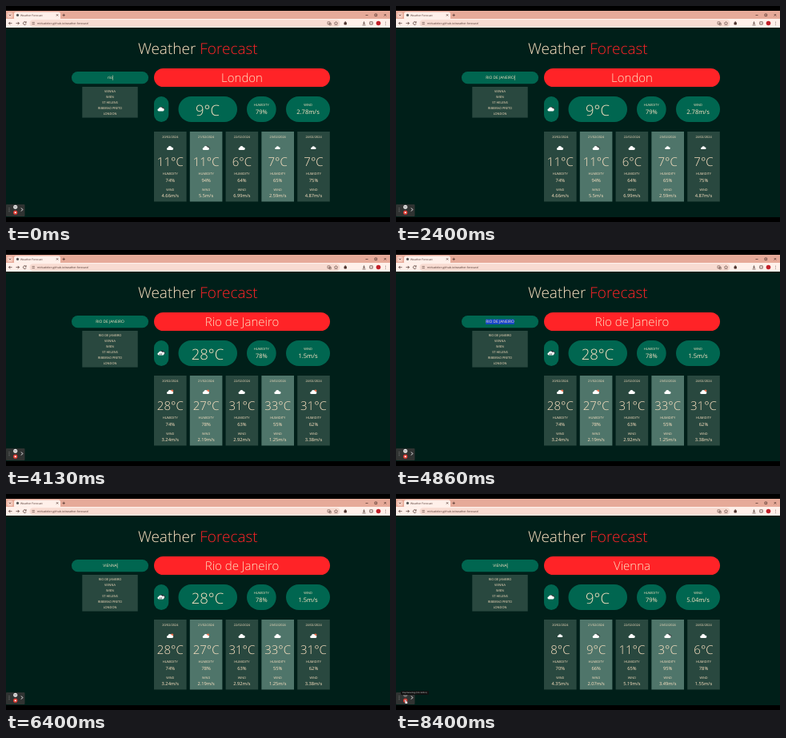
Write an HTML page that moves like this. It is 480x270 px and loops after 8.46 s.

```html
<!DOCTYPE html>
<html lang="en">
<head>
<meta charset="utf-8">
<title>Weather Forecast</title>
<style>
html, body { margin: 0; width: 100%; height: 100%; overflow: hidden; background: #000; }
svg { display: block; width: 480px; height: 270px; }
text { font-family: "Open Sans", "Noto Sans", sans-serif; text-rendering: geometricPrecision; }
</style>
</head>
<body>
<svg id="stage" viewBox="0 0 480 270"></svg>
<script>
const LOOP = 8460;
const CREAM = '#ffe4c4', GREEN = '#006650', RED = '#ff2327', PAGE = '#001f19', INK = '#4a302a';
const stage = document.getElementById('stage');

// Each day: temperature, humidity, wind, icon
const cities = {
  london: { name: 'London', now: [9, 79, 2.78, 'broken'], days: [
    [11, 74, 4.66, 'cloud'], [11, 94, 5.5, 'broken'], [6, 64, 6.99, 'cloud'],
    [7, 65, 2.59, 'small'], [7, 75, 4.87, 'small']] },
  rio: { name: 'Rio de Janeiro', now: [28, 78, 1.5, 'rain'], days: [
    [28, 74, 3.24, 'sun'], [27, 78, 2.19, 'sun'], [31, 63, 2.92, 'cloud'],
    [33, 55, 1.25, 'cloud'], [31, 62, 3.38, 'sun']] },
  vienna: { name: 'Vienna', now: [9, 79, 5.04, 'broken'], days: [
    [8, 70, 4.35, 'small'], [9, 66, 2.07, 'broken'], [11, 65, 5.19, 'cloud'],
    [3, 95, 3.49, 'broken'], [6, 78, 1.55, 'cloud']] }
};
const history = ['VIENNA', 'WIEN', 'ST HELENS', 'RIBEIRAO PRETO', 'LONDON'];

const rect = (x, y, w, h, fill, r = 0) =>
  `<rect x="${x}" y="${y}" width="${w}" height="${h}" rx="${r}" fill="${fill}"/>`;
const dot = (x, y, r, fill) => `<circle cx="${x}" cy="${y}" r="${r}" fill="${fill}"/>`;
const line = (d, color = INK, w = .7) =>
  `<path d="${d}" fill="none" stroke="${color}" stroke-width="${w}"/>`;
const text = (s, x, y, size, { fill = CREAM, weight = 400, anchor = 'middle', id = '' } = {}) =>
  `<text x="${x}" y="${y}" font-size="${size}" fill="${fill}" font-weight="${weight}"
    text-anchor="${anchor}" id="${id}">${s}</text>`;
const light = { weight: 300 };
const left = { anchor: 'start', fill: INK };

const puff = (x, y, k, fill) => `<path fill="${fill}" transform="translate(${x} ${y}) scale(${k})"
  d="M-3 2.5a1.6 1.6 0 0 1 0-3.2a2.6 2.6 0 0 1 5-.3a1.8 1.8 0 0 1 .8 3.5z"/>`;

function icon(kind, x, y) {
  if (kind === 'small') return puff(x, y - .5, .75, '#fff');
  const behind = {
    broken: puff(x + 1.3, y - .9, .85, '#3d4444'),
    sun: dot(x + 2.3, y - 1.6, 1.7, '#ec6e4c'),
    rain: puff(x + 1.6, y - 1, .9, '#263038') + dot(x + 3, y - .3, 1.3, '#fff')
  }[kind] || '';
  const drops = kind === 'rain' ? line(`M${x - 1} ${y + .3}l-1 2m3-2l-1 2`, '#263038', .8) : '';
  return behind + puff(x, y, .95, '#fff') + drops;
}

function browser() {
  return rect(0, 6, 480, 11, '#e6aa99') + rect(1.5, 8, 7, 7, '#f3cabd', 2)
    + rect(10, 7.5, 58, 10, '#fff0ea', 2.5) + rect(0, 16, 480, 11, '#fff0ea')
    + rect(29.5, 17.3, 388, 8.6, '#f8dbd1', 4.3)
    + line('M3.8 10.8l1.2 1.2l1.2-1.2') + dot(14.5, 11.4, 1.6, '#555')
    + text('Weather Forecast', 18, 12.8, 3.4, left)
    + line('M63 10.3l2.2 2.2m0-2.2l-2.2 2.2M70.5 11.4h3.4m-1.7-1.7v3.4')
    + line('M449.5 11.5h3M461 10h2.6v2.6h-2.6zM472.6 10l2.6 2.6m0-2.6l-2.6 2.6')
    + line('M7.5 21.6h-4m1.7-1.7l-1.7 1.7l1.7 1.7M12.5 21.6h4m-1.7-1.7l1.7 1.7l-1.7 1.7')
    + line('M25 20.6a1.9 1.9 0 1 0 .2 1.6M25.2 19.3v1.6h-1.6')
    + line('M32.5 20.6h3.4m-3.4 2h3.4', INK, .6)
    + text('mirkadelon.github.io/weather-forecast/', 39, 23, 3.5, left)
    + line('M402 19.8h3v3h-3zM404 21.5h2.3v2.3H404z', INK, .5)
    + line('M412.5 19.5l.7 1.5l1.6.2l-1.2 1.1l.3 1.6l-1.4-.8l-1.4.8l.3-1.6l-1.2-1.1l1.6-.2z', INK, .5)
    + rect(422.5, 20.2, 3.4, 3.2, INK, .7) + dot(424.2, 20, .8, INK)
    + line('M447.5 19.3v3m-1.4-1.3l1.4 1.4l1.4-1.4M445.5 23.8h4M454.8 19.8h3.4v3.2h-3.4z')
    + dot(465.5, 21.5, 2.8, '#c2202a')
    + [20, 21.6, 23.2].map(y => dot(474.5, y, .45, INK)).join('');
}

function recorder(hover) {
  const bar = rect(0, 248, 23.5, 15, '#303332', 1)
    + [252.8, 254.8, 256.8].map(y => dot(4, y, .5, '#999')).join('')
    + dot(11.7, 251.2, 2.5, hover ? '#777' : '#eee') + dot(11.7, 258.2, 2.6, '#e23a32')
    + line('M10.8 250.2v2m1.8-2v2', '#444', .6) + rect(10.8, 257.3, 1.8, 1.8, '#fff')
    + line('M19 252.5l1.8 2l-1.8 2', '#fff', .9);
  if (!hover) return bar;
  return bar + rect(6, 246, 35, 5, '#111', .8)
    + text('Stop Recording (Ctrl+Shift+X)', 23.2, 249.4, 2.3, { fill: '#fff' })
    + '<path d="M11.3 257v5h3v-2.6l-2-.5V257z" fill="#fff" stroke="#222" stroke-width=".3"/>';
}

function card([temp, humidity, wind, kind], i) {
  const x = 185 + i * 44.8, c = x + 20.3;
  return rect(x, 157, 40.6, 87.5, i % 2 ? '#4f756a' : '#29483f')
    + text(`${20 + i}/02/2024`, c, 165.4, 3.8) + icon(kind, c, 177.7)
    + text(temp + '°C', c, 199.6, 15, light)
    + text('HUMIDITY', c, 211.4, 4) + text(humidity + '%', c, 219.5, 5.8)
    + text('WIND', c, 230.5, 3.8) + text(wind + 'm/s', c, 239, 5.7);
}

function page({ city, list, input, hover }) {
  const { name, now: [temp, humidity, wind, kind], days } = cities[city];
  return rect(0, 27, 480, 237, PAGE) + browser()
    + text(`Weather <tspan fill="${RED}">Forecast</tspan>`, 239.8, 60, 19, light)
    + rect(82, 82, 96, 15.3, GREEN, 7.6)
    + '<rect id="mark" y="86.6" height="6.2"/>'
    + text(input, 130, 91.4, 4.85, { id: 'input' })
    + rect(95.3, 101, 69.4, 3.6 + list.length * 7, '#29483f')
    + list.map((s, i) => text(s, 130, 107.6 + i * 7, 3.9)).join('')
    + rect(185, 78, 220, 23, RED, 11.5) + text(name, 295, 95, 15, light)
    + rect(185, 113, 18.3, 32, GREEN, 9.1) + icon(kind, 193.8, 129)
    + rect(215.5, 113, 73.5, 32, GREEN, 16) + text(temp + '°C', 252, 137, 18.5, light)
    + rect(301, 113, 36.7, 32, GREEN, 16) + text('HUMIDITY', 319.3, 124.6, 4)
    + text(humidity + '%', 319.3, 135, 7.5)
    + rect(350, 113, 55, 32, GREEN, 16) + text('WIND', 377.5, 124.6, 4)
    + text(wind + 'm/s', 377.5, 135, 7.6)
    + days.map(card).join('') + recorder(hover);
}

const typed = (word, t, start, end) =>
  word.slice(0, 1 + Math.floor((t - start) / (end - start) * (word.length - 1)));

function stateAt(t) {
  const city = t < 2800 ? 'london' : t < 7000 ? 'rio' : 'vienna';
  const input = t < 1000 ? 'rio' : t < 5200
    ? typed('RIO DE JANEIRO', t, 1000, 2300) : typed('VIENNA', t, 5200, 6250);
  const lastKey = t < 1000 ? 0 : t < 2300 ? t : t < 5200 ? 2300 : t < 6250 ? t : 6250;
  return {
    city, input,
    list: city === 'london' ? history : ['RIO DE JANEIRO', ...history],
    selected: (t >= 600 && t < 1000) || (t >= 4300 && t < 5200),
    caret: (t - lastKey) % 1060 < 530,
    hover: t >= 8000
  };
}

function markInput({ selected, caret }) {
  const width = document.getElementById('input').getComputedTextLength();
  const mark = document.getElementById('mark');
  mark.setAttribute('x', selected ? 130 - width / 2 : 130.2 + width / 2);
  mark.setAttribute('width', selected ? width : caret ? .5 : 0);
  mark.setAttribute('fill', selected ? '#1746cf' : CREAM);
}

let shown = '';
function frame() {
  const state = stateAt(performance.now() % LOOP);
  const key = JSON.stringify(state);
  if (key !== shown) {
    shown = key;
    stage.innerHTML = page(state);
    markInput(state);
  }
  requestAnimationFrame(frame);
}
frame();
</script>
</body>
</html>
```
